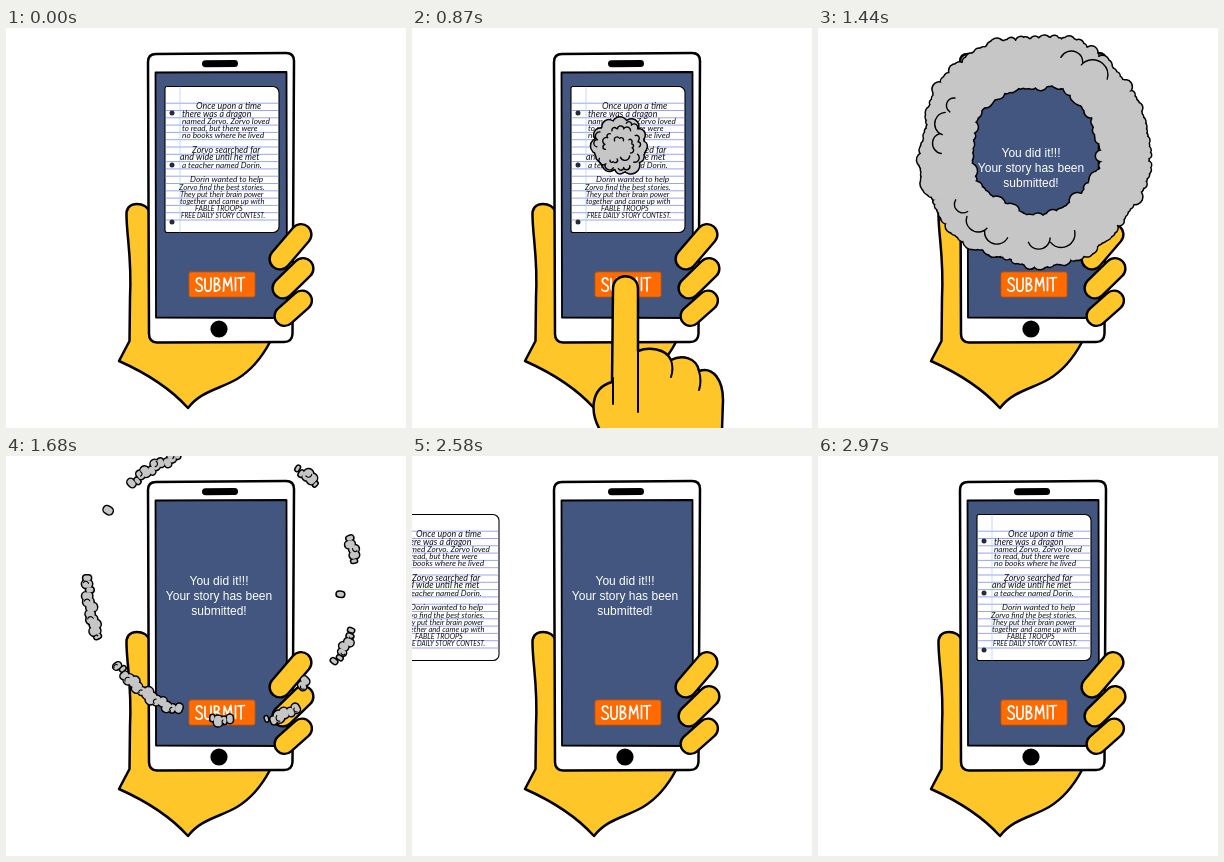
Animation of 400 by 400 pixels, one loop 3570 ms. Source, as an HTML page with a canvas:

```html
<!DOCTYPE html>
<html lang="en">
<head>
<meta charset="utf-8">
<title>Story submission</title>
<style>
  html, body { margin: 0; width: 100%; height: 100%; overflow: hidden; background: #fff; }
  canvas { display: block; width: 400px; height: 400px; }
</style>
</head>
<body>
<canvas id="stage" aria-label="A hand holds a phone and taps SUBMIT"></canvas>
<script>
const LOOP = 3570, STEP = 30;
const YELLOW = '#ffc629', BLUE = '#42567f', ORANGE = '#ff6b00', GREY = '#c6c6c6', INK = '#000';
const canvas = document.getElementById('stage');
const ctx = canvas.getContext('2d');
const dpr = window.devicePixelRatio || 1;
canvas.width = canvas.height = 400 * dpr;

const lerp = (a, b, k) => a + (b - a) * k;
const clamp = k => Math.max(0, Math.min(1, k));
const rad = deg => deg * Math.PI / 180;

// Linear interpolation through [time, value] keys
function track(t, keys) {
  if (t <= keys[0][0]) return keys[0][1];
  for (let i = 1; i < keys.length; i++) {
    const [t0, a] = keys[i - 1], [t1, b] = keys[i];
    if (t <= t1) return lerp(a, b, (t - t0) / (t1 - t0));
  }
  return keys[keys.length - 1][1];
}

let seed = 11;
const random = () => (seed = (seed * 16807) % 2147483647) / 2147483647;

function draw(path, fill, width = 2.5, stroke = INK) {
  const p = typeof path === 'string' ? new Path2D(path) : path;
  if (fill) { ctx.fillStyle = fill; ctx.fill(p); }
  if (width) { ctx.lineWidth = width; ctx.strokeStyle = stroke; ctx.stroke(p); }
}

function box(x, y, w, h, r) {
  const p = new Path2D();
  p.roundRect(x, y, w, h, r);
  return p;
}

function disc(x, y, r, fill) {
  ctx.beginPath();
  ctx.arc(x, y, r, 0, 7);
  ctx.fillStyle = fill;
  ctx.fill();
}

function line(x0, y0, x1, y1, width, color) {
  ctx.beginPath();
  ctx.moveTo(x0, y0);
  ctx.lineTo(x1, y1);
  ctx.lineWidth = width;
  ctx.strokeStyle = color;
  ctx.stroke();
}

const PALM = 'M144 184C141 178 136 176 131 176C123 176 120 181 120.500 188C121 212 126 230 124 270' +
  'L123.500 313L113 333C140 345 163 359 182 380C195 363 214 361 231 351C246 342 256 329 264 314L200 290L144 300Z';
const PHONE = 'M150 26L280 25Q288 25 288 33L286.500 306Q286 314 278 314L151 314.500Q143 314 143 306L142 34Q142 26 150 26Z';
const SCREEN = 'M149.500 44.500L280.500 44L281 290L150 289.500Z';
const SUBMIT = [
  'M196 252C194 248.500 190.300 250 190.300 253C190.300 256.500 196.300 256 196.300 260C196.300 264 191.500 264 189.800 261.500',
  'M199 250.500V259C199 264.500 205 264.500 205 259V250',
  'M208.500 250V263M208.500 250.500C214.500 248.500 214.500 256 209 256.200C215.500 256 215.500 263.500 208.500 263',
  'M217.500 263L218.300 250L221.500 258L224.800 249.500L226 262.500',
  'M229.500 249.500V262.500',
  'M231.500 250L238.500 249.500M235 250V263'
].join('');
const FINGERS = [[274, 231, 295, 206.5, 11], [277, 260, 297, 240.5, 11], [278.500, 288, 296, 272.5, 10.5]];

function drawPhone() {
  draw(PALM, YELLOW);
  draw(PHONE, '#fff');
  line(199.500, 35.800, 228.500, 35.500, 7, INK);
  draw(SCREEN, BLUE, 1.8);
  disc(213, 301, 8.6, INK);
  draw(box(183, 244, 66, 25, 2), ORANGE, 0.8, '#c95300');
  draw(SUBMIT, null, 1.7, '#fff');
}

function drawFingers() {
  for (const [x0, y0, x1, y1, r] of FINGERS) {
    line(x0, y0, x1, y1, r * 2 + 1.2, INK);
    line(x0, y0, x1, y1, r * 2 - 3.6, YELLOW);
  }
}

function drawMessage() {
  ctx.fillStyle = '#fff';
  ctx.font = '12px "Liberation Sans", Arial, sans-serif';
  ctx.textAlign = 'center';
  ['You did it!!!', 'Your story has been', 'submitted!']
    .forEach((s, i) => ctx.fillText(s, 213, 129 + i * 15));
}

// text, x, baseline, size
const STORY = [
  ['Once upon a time', 190, 81, 8.9],
  ['there was a dragon', 176, 88.5, 8.8],
  ['named Zorvo. Zorvo loved', 176, 96, 8.2],
  ['to read, but there were', 176, 103, 8],
  ['no books where he lived', 176, 110, 8.3],
  ['Zorvo searched far', 186, 125, 8.9],
  ['and wide until he met', 174, 132, 8.9],
  ['a teacher named Dorin.', 176, 139.5, 8.2],
  ['Dorin wanted to help', 184, 154, 8.4],
  ['Zorvo find the best stories.', 173, 161.5, 7.8],
  ['They put their brain power', 174, 169, 7.6],
  ['together and came up with', 174, 176, 7.6],
  ['FABLE TROOPS', 189, 183, 7.2],
  ['FREE DAILY STORY CONTEST.', 175, 190, 6.6]
];

function drawPaper(dx) {
  ctx.save();
  ctx.translate(dx, 0);
  draw(box(159, 58.500, 114, 146, [2, 6, 6, 2]), '#fff', 1.1);
  for (let i = -1; i < 16; i++) line(160, 82.5 + i * 7.3, 272, 82.5 + i * 7.3, 0.8, '#7f8ff0');
  line(174, 59, 174, 204, 0.7, '#a9cdf0');
  for (const y of [85, 137, 194]) disc(166, y, 2.5, '#252a3c');
  ctx.fillStyle = '#111';
  ctx.textAlign = 'left';
  for (const [s, x, y, size] of STORY) {
    ctx.font = `italic ${size}px Lato, "Open Sans", sans-serif`;
    ctx.fillText(s, x, y);
  }
  ctx.restore();
}

const FIST = 'M188 402C178 384 178 360 200 354L201 261C201 244 226 244 226 261L226 323' +
  'C236 319 254 320 259 332C270 326 285 330 287 343C301 338 311 352 311 372L310 402V560H190Z';
const CREASES = 'M201 350V376M226 320V384M259 332C261 338 261 343 259 349M287 343C289 350 289 356 287 362';

function drawTap(dy) {
  ctx.save();
  ctx.translate(0, dy);
  draw(FIST, YELLOW);
  draw(CREASES, null, 2);
  ctx.restore();
}

// Wisps left after the cloud breaks up: start angle, end angle, size, radial offset
const WISPS = [
  [226, 252, 1, 0], [211.500, 214, 1, 0], [157, 183, 1.1, 0], [108, 143, 1, -2], [86, 95, 1, 0], [59, 73, 1, 7],
  [49, 53, 0.9, -8], [20, 35, 0.95, 0], [4, 6, 0.6, -18], [338, 351, 0.95, -3], [302, 313, 0.95, 0]
];
const PUFFS = Array.from({ length: 144 }, (_, i) => {
  const deg = i * 2.5, a = rad(deg);
  const [a0, a1, size, drift] = WISPS.find(w => deg >= w[0] && deg <= w[1]) || [0, 1, 0, 0];
  return {
    i, a, drift,
    last: size * (0.65 + 0.35 * Math.sin(Math.PI * (deg - a0) / (a1 - a0))),
    size: 0.7 + 0.6 * random(),
    lobe: 0.025 * Math.sin(5 * a + 1) + 0.02 * Math.sin(9 * a),
    shift: Math.sin(i * 2.1) * (0.4 + 0.6 * random())
  };
});

// Scalloped folds inside the cloud: x, y, radius, start, end, bumps
const FOLDS = [
  [-0.04, -0.12, 0.12, 200, 350, 2], [0.1, 0.02, 0.3, -50, 40, 4], [0.17, 0.17, 0.16, 30, 150, 1],
  [-0.23, 0.42, 0.1, 10, 160, 2], [0, 0, 0.5, 165, 235, 4], [0, 0, 0.58, 240, 305, 4],
  [0, 0, 0.62, -35, 5, 3], [0, 0.05, 0.62, 20, 50, 1], [0, 0, 0.74, 65, 95, 2],
  [0, 0, 0.76, 108, 150, 3], [0, 0, 0.78, 178, 215, 3], [0, 0, 0.8, 285, 315, 2]
];

function drawFolds(R, hole) {
  const detail = Math.min(1, 0.4 + R / 160);
  ctx.beginPath();
  for (const [x, y, r, a0, a1, bumps] of FOLDS) {
    if (hole && (r < 0.5 || r * R < hole + 9)) continue;
    const n = Math.ceil(bumps * detail), step = rad(a1 - a0) / n;
    for (let i = 0; i < n; i++) {
      const a = rad(a0) + step * (i + 0.5), b = r * R * step * (0.5 + 0.12 * Math.sin(i * 4 + r * 20));
      const px = x * R + Math.cos(a) * r * R, py = y * R + Math.sin(a) * r * R;
      ctx.moveTo(px + b * Math.cos(a - 1.5), py + b * Math.sin(a - 1.5));
      ctx.arc(px, py, b, a - 1.5, a + 1.2);
    }
  }
  ctx.lineWidth = 1.4;
  ctx.strokeStyle = INK;
  ctx.stroke();
}

function drawSmoke(t) {
  if (t < 720 || t >= 1920) return;
  const R = track(t, [[690, 0], [870, 29], [1050, 55], [1110, 64], [1230, 98], [1680, 142], [1890, 168]]);
  const p = clamp((t - 1230) / 450);
  const breakup = clamp((p - 0.35) / 0.55);
  const fade = track(t, [[1680, 1], [1890, 0.3]]);
  const bump = lerp(Math.min(10.5, R * 0.24), 4.5, p) * fade;
  const stride = R < 60 ? 12 : 5;
  const outer = R - bump;
  const inner = p ? outer - lerp(outer, 2.5 * fade, Math.pow(p, 0.6)) : 0;

  ctx.save();
  ctx.translate(track(t, [[870, 208], [1230, 216], [1680, 218]]), track(t, [[870, 118], [1230, 117], [1680, 128]]));
  const shown = PUFFS.map(f => {
    const big = f.i % stride === 0 ? 1 : lerp(0.45, 1, p);
    const s = lerp(1, f.last, breakup);
    const offset = f.shift * 2.5 * p + f.drift * breakup + f.lobe * R * (1 - p);
    return { ...f, r: bump * f.size * big * s, s, from: inner + offset, to: outer + offset };
  }).filter(f => f.s > 0.06);
  const spokes = (extra, color) => {
    for (const f of shown) {
      const c = Math.cos(f.a), s = Math.sin(f.a);
      line(c * f.from, s * f.from, c * f.to, s * f.to, Math.max(0.5, f.r * 2 + extra), color);
    }
  };
  spokes(1.2, INK);
  spokes(-1.8, GREY);
  if (p < 0.5) drawFolds(R, inner);
  if (p > 0.5) {
    ctx.beginPath();
    for (const f of shown) {
      if (f.i % 3 || f.r < 2) continue;
      const x = Math.cos(f.a) * f.to, y = Math.sin(f.a) * f.to, b = f.r * 0.6, a = f.a + f.shift * 2;
      ctx.moveTo(x + b * Math.cos(a), y + b * Math.sin(a));
      ctx.arc(x, y, b, a, a + 2.4);
    }
    ctx.lineWidth = 1.1;
    ctx.strokeStyle = INK;
    ctx.stroke();
  }
  ctx.restore();
}

function render(t) {
  ctx.setTransform(dpr, 0, 0, dpr, 0, 0);
  ctx.lineCap = ctx.lineJoin = 'round';
  ctx.fillStyle = '#fff';
  ctx.fillRect(0, 0, 400, 400);
  drawPhone();
  if (t < 1230) drawPaper(0);
  else if (t < 2970) drawMessage();
  drawFingers();
  if (t >= 2400) drawPaper(Math.min(0, (t - 2970) * 186 / 390));
  drawSmoke(t);
  const dy = track(t, [[0, 163], [450, 0], [975, 0], [1230, 92], [1425, 163]]);
  if (dy < 155) drawTap(dy);
}

const start = performance.now();
function tick() {
  const t = (performance.now() - start) % LOOP;
  render(Math.floor(t / STEP) * STEP);
  requestAnimationFrame(tick);
}
tick();
</script>
</body>
</html>
```
